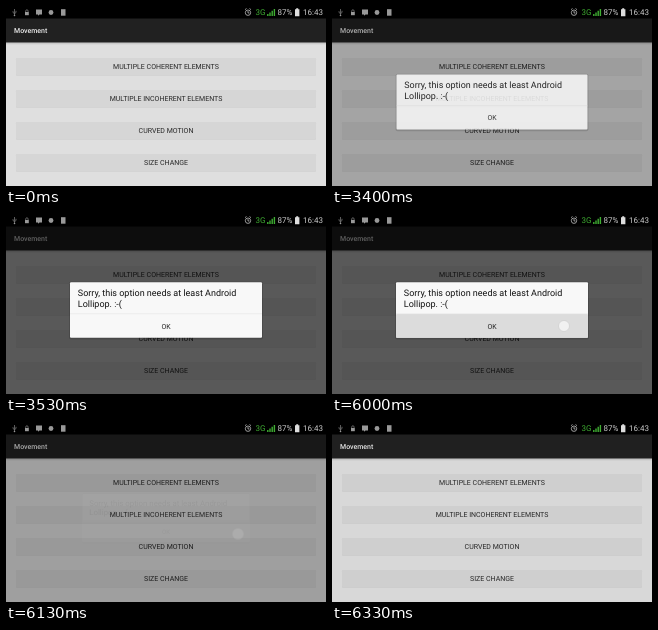
An HTML page for the animation above (6.39 s loop, 320 px wide and 180 px high).

```html
<!DOCTYPE html>
<html lang="en">
<head>
<meta charset="utf-8">
<title>Movement</title>
<style>
  html, body { margin: 0; width: 100%; height: 100%; overflow: hidden; background: #000; }
  svg { display: block; width: 100%; height: 100%; }
  text { font: 7px Roboto, sans-serif; fill: #262626; text-rendering: geometricPrecision; }
  .status text { font-size: 8px; fill: #ccc; }
  .middle { text-anchor: middle; }
  .message { font-size: 9px; fill: #111; }
</style>
</head>
<body>
<svg viewBox="0 0 320 180">
  <defs>
    <linearGradient id="shade" x2="0" y2="1">
      <stop stop-opacity=".16"/><stop offset="1" stop-opacity="0"/>
    </linearGradient>
  </defs>

  <rect width="320" height="180" fill="#dfdfdf"/>
  <rect y="12" width="320" height="24.5" fill="#212121"/>
  <rect y="36.5" width="320" height="2.5" fill="url(#shade)"/>
  <text x="8" y="27" style="fill:#eee;font-weight:500">Movement</text>
  <g id="buttons" class="middle"></g>
  <rect id="dim" y="12" width="320" height="168"/>

  <g id="dialog">
    <rect x="63" y="67.5" width="194" height="58" rx="2" opacity=".15"/>
    <rect x="64" y="68.3" width="192" height="55.4" rx="1" fill="#f8f8f8"/>
    <rect id="okPress" x="64" y="100" width="192" height="23.7" rx="1" fill="#dcdcdc"/>
    <path d="M64 99.75H256" stroke="#dedede" stroke-width=".5"/>
    <text class="message" x="71.8" y="81.8">Sorry, this option needs at least Android</text>
    <text class="message" x="71.8" y="92.8">Lollipop. :-(</text>
    <text class="middle" x="160" y="114.5">OK</text>
  </g>
  <circle id="touch" r="5.5" fill="#f4f4f4" stroke="#ccc" stroke-width=".7"/>

  <g class="status">
    <rect width="320" height="12.5"/>
    <g fill="none" stroke="#858585" stroke-width=".7">
      <path d="M8.5 3V9.5M7 5.2V6.5L8.5 7.7L10 6.5V4.8"/>
      <path d="M19.7 6V5a1.2 1.2 0 0 1 2.400 0V6"/>
    </g>
    <g fill="#999">
      <circle cx="8.5" cy="9.5" r=".8"/>
      <rect x="19" y="6" width="3.800" height="3.200"/>
      <path d="M30 3.500h6v5h-2.500l-1.500 1.300v-1.300h-2z"/>
      <circle cx="45" cy="6.500" r="2.400"/>
      <rect x="55" y="3.200" width="4.500" height="6.500"/>
    </g>
    <g fill="none" stroke="#bbb" stroke-width=".8">
      <circle cx="242" cy="6.700" r="2.700"/>
      <path d="M242 5V7H243.500M239 3.700L240.500 2.500M245 3.700L243.500 2.500"/>
    </g>
    <text x="249.500" y="9.300" style="fill:#3fae32">3G</text>
    <path d="M261.800 10V8M264 10V6.500M266.200 10V4.800M268.400 10V3" stroke="#3fae32" stroke-width="1.400"/>
    <text x="271.500" y="9.300">87%</text>
    <path d="M289 3.200h1.200v-1h2v1h1.200v7h-4.400z" fill="#ddd"/>
    <text x="297" y="9.300">16:43</text>
  </g>
</svg>
<script>
const LOOP = 6390, FRAME = 1000 / 15;
const byId = id => document.getElementById(id);
const buttons = byId('buttons'), dim = byId('dim'), dialog = byId('dialog');
const okPress = byId('okPress'), touch = byId('touch');

const labels = ['MULTIPLE COHERENT ELEMENTS', 'MULTIPLE INCOHERENT ELEMENTS', 'CURVED MOTION', 'SIZE CHANGE'];
buttons.innerHTML = labels.map((label, i) => `<g transform="translate(0 ${i * 32})">
  <rect x="10" y="52.3" width="300" height="17.500" rx="1" fill="#cfcfcf"/>
  <rect class="face" x="10" y="52" width="300" height="17.300" rx="1" fill="#d6d6d6"/>
  <text x="160" y="63">${label}</text></g>`).join('');
const curvedFace = buttons.querySelectorAll('.face')[2];

const ramp = (t, from, to) => Math.min(1, Math.max(0, (t - from) / (to - from)));

function render(time) {
  const t = Math.floor(time / FRAME + 0.1) * FRAME;
  const opening = t < 5000;
  const closing = ramp(t, 6040, 6137);

  curvedFace.setAttribute('fill', t > 3060 && t < 3320 ? '#b7b7b7' : '#d6d6d6');
  dim.setAttribute('opacity', 0.6 * (opening ? ramp(t, 3295, 3530) : (1 - ramp(t, 6000, 6430)) ** 2));

  const scale = opening ? 1 - 0.1 * (1 - ramp(t, 3270, 3440)) ** 2 : 1 - 0.135 * closing;
  dialog.setAttribute('opacity', opening ? ramp(t, 3270, 3420) : 1 - closing);
  dialog.setAttribute('transform', `translate(160 96) scale(${scale}) translate(-160 -96)`);
  okPress.setAttribute('opacity', t > 5990 ? 1 : 0);

  const touchAlpha = opening
    ? (t > 3060 ? 1 - ramp(t, 3130, 3230) : 0)
    : (t > 5990 ? 1 - ramp(t, 6070, 6145) : 0);
  touch.setAttribute('opacity', 0.9 * touchAlpha);
  touch.setAttribute('transform', opening ? 'translate(39 129.500)' : 'translate(232 112)');
}

const start = performance.now();
function tick() {
  render((performance.now() - start) % LOOP);
  requestAnimationFrame(tick);
}
tick();
</script>
</body>
</html>
```
